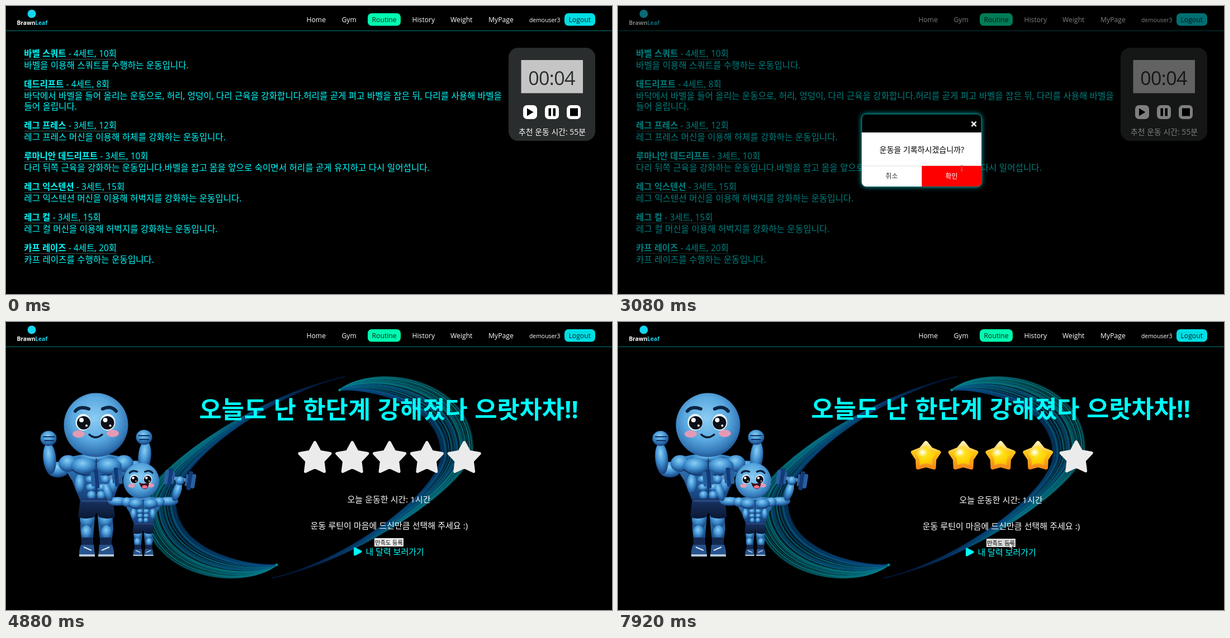
An HTML page for the animation above (7990 ms loop, 1084 by 517 pixels).

```html
<!DOCTYPE html>
<html lang="ko">
<head>
<meta charset="utf-8">
<title>Workout routine</title>
<style>
  html, body { margin: 0; width: 100%; height: 100%; overflow: hidden; background: #000; }
  svg { display: block; width: 100vw; height: 100vh; }
  text { font-family: 'Open Sans', 'Noto Sans CJK KR', 'Noto Sans KR', sans-serif; white-space: pre; }
  .nav { font-size: 12.2px; fill: #fff; }
  .mid { text-anchor: middle; }
  .cyan { fill: #0ff; }
  .name { font-size: 15.4px; word-spacing: .3px; }
  .name tspan { font-weight: 700; }
  .desc { font-size: 15.6px; word-spacing: .35px; }
  .msg { font-size: 15px; fill: #fff; word-spacing: .2px; }
  .btn { font-size: 12px; }
  .ink { fill: none; stroke: #0f3263; stroke-width: 1.8; stroke-linecap: round; }
  .limb { fill: none; stroke-linecap: round; stroke-linejoin: round; }
</style>
</head>
<body>
<svg viewBox="0 0 1084 517" preserveAspectRatio="none">
  <defs>
    <radialGradient id="skin" cx=".47" cy=".4" r=".62">
      <stop offset="0" stop-color="#8ccdf3"/><stop offset=".55" stop-color="#5aa9e0"/>
      <stop offset=".85" stop-color="#3478b8"/><stop offset="1" stop-color="#1d4f8c"/>
    </radialGradient>
    <radialGradient id="muscle" cx=".45" cy=".32" r=".68">
      <stop offset="0" stop-color="#8ad0f5"/><stop offset=".5" stop-color="#4292d2"/><stop offset="1" stop-color="#143f7c"/>
    </radialGradient>
    <linearGradient id="flesh" x1="0" y1="0" x2="0" y2="1">
      <stop offset="0" stop-color="#3a8acb"/><stop offset="1" stop-color="#133b74"/>
    </linearGradient>
    <linearGradient id="cloth" x1="0" y1="0" x2="0" y2="1">
      <stop offset="0" stop-color="#1a3566"/><stop offset="1" stop-color="#0a1733"/>
    </linearGradient>
    <linearGradient id="teal" gradientUnits="userSpaceOnUse" x1="770" y1="190" x2="545" y2="470">
      <stop offset="0" stop-color="#048a8c"/><stop offset=".45" stop-color="#067c88"/>
      <stop offset=".8" stop-color="#05386a"/><stop offset="1" stop-color="#03183a" stop-opacity=".2"/>
    </linearGradient>
    <linearGradient id="blue" gradientUnits="userSpaceOnUse" x1="770" y1="190" x2="545" y2="470">
      <stop offset="0" stop-color="#064a82"/><stop offset=".6" stop-color="#053f74"/>
      <stop offset="1" stop-color="#03183a" stop-opacity=".2"/>
    </linearGradient>
    <radialGradient id="gold" cx=".42" cy=".38" r=".65">
      <stop offset="0" stop-color="#ffec3a"/><stop offset=".6" stop-color="#ffd200"/><stop offset="1" stop-color="#fba51c"/>
    </radialGradient>
    <linearGradient id="rim" x1="0" y1="0" x2="0" y2="1">
      <stop offset="0" stop-color="#fff0b0"/><stop offset=".4" stop-color="#ffc414"/><stop offset="1" stop-color="#f18a1c"/>
    </linearGradient>
    <radialGradient id="shine">
      <stop offset="0" stop-color="#fff"/><stop offset="1" stop-color="#fff" stop-opacity="0"/>
    </radialGradient>
    <clipPath id="round"><rect x="436" y="194" width="214" height="130" rx="8"/></clipPath>

    <g id="face">
      <circle cx="161" cy="185" r="57.5" fill="url(#skin)"/>
      <g fill="#e59ab4"><ellipse cx="130" cy="201" rx="11" ry="6.500"/><ellipse cx="191" cy="200" rx="11" ry="6.500"/></g>
      <g fill="#e8f3fb"><ellipse cx="138" cy="180" rx="13.500" ry="15"/><ellipse cx="182" cy="180" rx="13.500" ry="15"/></g>
      <g fill="#0b0f18"><circle cx="139" cy="181" r="12"/><circle cx="181.500" cy="181" r="12"/></g>
      <g fill="#fff"><circle cx="135" cy="176" r="4"/><circle cx="177.500" cy="176" r="4"/><circle cx="144" cy="186" r="2"/><circle cx="186.500" cy="186" r="2"/></g>
      <path class="limb" d="M124 160Q132 150 148 156M173 156Q188 149 197 160" stroke="#0c2542" stroke-width="6"/>
    </g>
    <g id="body">
      <path d="M134 335H160L157 372L155 400H136L133 372ZM163 335H189L192 372L188 400H169L166 372Z" fill="url(#flesh)"/>
      <g fill="url(#muscle)">
        <ellipse cx="145" cy="354" rx="13" ry="17"/><ellipse cx="178" cy="354" rx="13" ry="17"/>
        <ellipse cx="144" cy="378" rx="10" ry="13"/><ellipse cx="180" cy="378" rx="10" ry="13"/>
      </g>
      <path d="M110 244Q160 228 212 244Q222 262 205 284L190 324H134L118 284Q101 262 110 244Z" fill="url(#flesh)"/>
      <g fill="url(#muscle)">
        <path d="M128 244Q160 226 194 244L161 252Z"/>
        <ellipse cx="111" cy="254" rx="17" ry="15"/><ellipse cx="211" cy="254" rx="17" ry="15"/>
        <ellipse cx="139" cy="259" rx="23" ry="15"/><ellipse cx="184" cy="259" rx="23" ry="15"/>
        <ellipse cx="132" cy="291" rx="9" ry="18"/><ellipse cx="191" cy="291" rx="9" ry="18"/>
        <ellipse cx="152" cy="283" rx="10" ry="7"/><ellipse cx="171" cy="283" rx="10" ry="7"/>
        <ellipse cx="152" cy="297" rx="9" ry="7"/><ellipse cx="171" cy="297" rx="9" ry="7"/>
        <ellipse cx="153" cy="311" rx="8" ry="8"/><ellipse cx="170" cy="311" rx="8" ry="8"/>
      </g>
      <path class="ink" d="M118 265Q138 282 161 270Q184 282 205 265M161.500 246V318"/>
      <path d="M133 317H191L195 350Q180 356 166 350L162 342L158 350Q142 356 129 350Z" fill="url(#cloth)"/>
      <path class="limb" d="M136 321H188" stroke="#25477e" stroke-width="4"/>
      <path d="M135 387H156V402H135ZM168 387H189V402H168Z" fill="#14284f"/>
      <path d="M134 400H157L159 420H131Q130 410 134 400ZM167 400H190Q194 410 193 420H165Z" fill="#27548f"/>
      <path d="M131 417H159V421H131ZM165 417H193V421H165Z" fill="#b4c6d8"/>
      <path d="M139 404L153 410M171 410L185 404" stroke="#dbe9f6" stroke-width="2"/>
    </g>
    <g id="bell">
      <rect x="-24" y="-3" width="48" height="6" fill="#6a8fc0"/>
      <g fill="#123a78"><rect x="-22" y="-17" width="8" height="34" rx="3"/><rect x="14" y="-17" width="8" height="34" rx="3"/></g>
      <g fill="#27609f"><rect x="-28" y="-13" width="7" height="26" rx="3"/><rect x="21" y="-13" width="7" height="26" rx="3"/>
        <rect x="-14" y="-11" width="4" height="22" rx="2"/><rect x="10" y="-11" width="4" height="22" rx="2"/></g>
    </g>
  </defs>

  <rect width="1084" height="517"/>

  <g id="header">
    <circle cx="46" cy="14" r="7.5" fill="#16d5ee"/>
    <text x="19.5" y="34" font-size="10.2" font-weight="700" fill="#fff">Brawn<tspan fill="#16d5ee">Leaf</tspan></text>
    <rect x="647" y="13" width="59" height="22.500" rx="7" fill="#00fcb0"/>
    <rect x="999" y="13" width="55" height="22.500" rx="7" fill="#00dfe4"/>
    <rect y="44" width="1084" height="1" fill="#007a78"/>
    <text x="936" y="28.5" font-size="10.4" font-weight="500" fill="#fff">demouser3</text>
  </g>

  <g id="list">
    <rect x="899" y="75" width="155" height="167" rx="17" fill="#2a2d2d"/>
    <rect x="921.5" y="97" width="110.5" height="59.5" fill="#c5c5c5"/>
    <text class="mid" x="976" y="141.5" font-size="34" letter-spacing="-.7" fill="#2a2d2d">00:04</text>
    <g fill="#fff"><rect x="925" y="178" width="25" height="25" rx="7"/><rect x="964" y="178" width="25" height="25" rx="7"/><rect x="1003" y="178" width="25" height="25" rx="7"/></g>
    <path d="M932 183.500L943.500 190.500L932 197.500ZM970.500 183.500H975V197.500H970.500ZM978.500 183.500H983V197.500H978.500ZM1009 183.500H1023V197.500H1009Z"/>
    <text class="mid" x="977" y="230.500" font-size="13.9" fill="#fff">추천 운동 시간: 55분</text>
  </g>

  <g id="art">
    <g id="right" fill="none"></g>
    <use href="#right" transform="rotate(180 540.5 279)"/>
    <g fill="url(#muscle)">
      <ellipse cx="93" cy="265" rx="20" ry="14"/><ellipse cx="231" cy="263" rx="20" ry="14"/>
      <ellipse cx="78" cy="245" rx="11.500" ry="28" transform="rotate(-5 78 245)"/>
      <ellipse cx="248" cy="241" rx="11.500" ry="28" transform="rotate(5 248 241)"/>
      <ellipse cx="76" cy="209" rx="14.500" ry="13.500"/><ellipse cx="247" cy="207" rx="14.500" ry="13.500"/>
    </g>
    <path class="ink" d="M67 206H87M69 213H85M237 204H257M239 211H255"/>
    <use href="#body"/>
    <use href="#face"/>
    <path class="limb" d="M149 202Q160 212 172 202" stroke="#0c1c33" stroke-width="3.500"/>
    <g fill="url(#muscle)">
      <ellipse cx="200" cy="322" rx="18" ry="8"/><ellipse cx="290" cy="322" rx="18" ry="8"/>
      <ellipse cx="182" cy="304" rx="7.500" ry="18" transform="rotate(-18 182 304)"/>
      <ellipse cx="306" cy="304" rx="7.500" ry="18" transform="rotate(18 306 304)"/>
    </g>
    <use href="#body" transform="translate(151.6 175.8) scale(.58)"/>
    <use href="#face" transform="translate(151.8 181.4) scale(.56)"/>
    <path d="M238 288Q247 293 256 287Q255 300 248 300Q241 299 238 288Z" fill="#3a1020"/>
    <ellipse cx="248" cy="296" rx="5" ry="3" fill="#f0708a"/>
    <use href="#bell" transform="translate(180 280) rotate(-5)"/>
    <use href="#bell" transform="translate(311 282) rotate(9)"/>
    <g fill="url(#muscle)"><circle cx="178" cy="283" r="8"/><circle cx="311" cy="285" r="8"/></g>
  </g>

  <g id="done">
    <g id="top">
      <text class="cyan" x="345.5" y="172.500" font-size="43.7" font-weight="700" word-spacing="1.3">오늘도 난 한단계 강해졌다 으랏차차!!</text>
      <g id="stars"></g>
    </g>
    <g id="low">
      <text class="msg mid" x="685" y="323.500">오늘 운동한 시간: 1시간</text>
      <text class="msg mid" x="685.500" y="370.500">운동 루틴이 마음에 드신만큼 선택해 주세요 :)</text>
      <rect id="save" x="659" y="388" width="52" height="15" fill="#efefef"/>
      <text class="mid" x="685" y="399.500" font-size="10.3">만족도 등록</text>
      <path class="cyan" d="M624 406.500V417.500L634.500 412Z" stroke="#0ff" stroke-width="4" stroke-linejoin="round"/>
      <text class="cyan" x="643.500" y="417.500" font-size="15">내 달력 보러가기</text>
    </g>
  </g>

  <g id="dialog">
    <rect width="1084" height="517" fill-opacity=".5"/>
    <rect x="436" y="194" width="214" height="130" rx="8" stroke="#0a8484" style="filter:drop-shadow(0 0 4px #00b4b4)"/>
    <g clip-path="url(#round)">
      <rect x="436" y="227" width="214" height="97" fill="#fff"/>
      <path d="M436 287H650M543.500 287V324" stroke="#dedede"/>
      <rect id="ok" x="543.500" y="287" width="107" height="37" fill="red"/>
    </g>
    <path d="M632.500 207.700L640.700 215.900M640.700 207.700L632.500 215.900" stroke="#fff" stroke-width="2.500"/>
    <text class="mid" x="543.500" y="262.500" font-size="14" font-weight="500">운동을 기록하시겠습니까?</text>
    <text class="btn mid" x="489.500" y="310" fill="#333">취소</text>
    <text id="okText" class="btn mid" x="596.500" y="310">확인</text>
  </g>

  <g id="cursor">
    <path id="arrow" d="M0 0V10L2.400 8L4 11.500L5.700 10.700L4.200 7.300H7.300Z" fill="#fff" stroke="#222" stroke-width=".7"/>
    <path id="hand" d="M-1 0Q0 -1 1 0V4.500L5 5.300Q6 5.700 6 7L5 12H-1.500L-4 8Q-4 6.500 -2.500 7L-1 8Z" fill="#fff" stroke="#222" stroke-width=".9"/>
    <path id="beam" d="M-2 -4.500H2M0 -4.500V4.500M-2 4.500H2" fill="none" stroke="#888"/>
  </g>
  <circle id="click" r="9" fill="#fff000" fill-opacity=".5"/>
</svg>
<script>
const LOOP = 7990;
const $ = id => document.getElementById(id);

function add(parent, tag, attrs, text) {
  const node = document.createElementNS('http://www.w3.org/2000/svg', tag);
  for (const key in attrs) node.setAttribute(key, attrs[key]);
  if (text) node.textContent = text;
  return parent.appendChild(node);
}
const show = (id, on) => { $(id).style.display = on ? '' : 'none'; };

// Navigation
[['Home', 537.5], ['Gym', 600.5], ['Routine', 654.5], ['History', 726.5], ['Weight', 795], ['MyPage', 863]]
  .forEach(([label, x]) => add($('header'), 'text', { class: 'nav', x, y: 28.8, style: label === 'Routine' ? 'fill:#06221c' : '' }, label));
add($('header'), 'text', { class: 'nav', x: 1006.5, y: 28.8, style: 'fill:#06222a' }, 'Logout');

// Exercises: centre line, underline end, name, amount, description lines
[
  [85, 198, '바벨 스쿼트', '4세트, 10회', '바벨을 이용해 스쿼트를 수행하는 운동입니다.'],
  [140, 185, '데드리프트', '4세트, 8회', '바닥에서 바벨을 들어 올리는 운동으로, 허리, 엉덩이, 다리 근육을 강화합니다.허리를 곧게 펴고 바벨을 잡은 뒤, 다리를 사용해 바벨을', '들어 올립니다.'],
  [214, 198, '레그 프레스', '3세트, 12회', '레그 프레스 머신을 이용해 하체를 강화하는 운동입니다.'],
  [269, 255, '루마니안 데드리프트', '3세트, 10회', '다리 뒤쪽 근육을 강화하는 운동입니다.바벨을 잡고 몸을 앞으로 숙이면서 허리를 곧게 유지하고 다시 일어섭니다.'],
  [324, 213, '레그 익스텐션', '3세트, 15회', '레그 익스텐션 머신을 이용해 허벅지를 강화하는 운동입니다.'],
  [379, 170, '레그 컬', '3세트, 15회', '레그 컬 머신을 이용해 허벅지를 강화하는 운동입니다.'],
  [434, 198, '카프 레이즈', '4세트, 20회', '카프 레이즈를 수행하는 운동입니다.'],
].forEach(([y, end, name, amount, ...lines]) => {
  const title = add($('list'), 'text', { class: 'name cyan', x: 32.3, y: y + 5.7 });
  add(title, 'tspan', {}, name);
  title.append(' - ' + amount);
  add($('list'), 'rect', { x: 32.5, y: y + 10, width: end - 32.5, height: 1, fill: '#3c5a5a' });
  lines.forEach((line, i) => add($('list'), 'text', { class: 'desc cyan', x: 32.3, y: y + 26.5 + 19 * i }, line));
});

// Ribbon strands, blended from the outer edge (k = 0) to the inner edge (k = 1)
let seed = 7;
const rand = () => (seed = seed * 16807 % 2147483647) / 2147483647;
for (let i = 0; i < 80; i++) {
  const k = Math.min(1, Math.max(0, i / 79 + (rand() - .5) * .06));
  const bx = 836 - 58 * k;
  add($('right'), 'path', {
    d: `M596 122C660 ${70 + 50 * k} ${bx} ${100 + 50 * k} ${bx} ${228 + 10 * k}` +
       `C${bx} ${285 + 15 * k} ${640 - 20 * k} 425 475 460`,
    stroke: rand() > .2 + .65 * k ? 'url(#teal)' : 'url(#blue)',
    'stroke-width': .6 + rand(), 'stroke-opacity': .3 + .5 * rand(),
  });
}
add($('right'), 'circle', { cx: 597, cy: 122, r: 2.5, fill: '#048a8c' });

// Rating stars
function star(cx, cy, r, inner, attrs) {
  const pts = Array.from({ length: 10 }, (_, i) => {
    const a = i * Math.PI / 5, q = i % 2 ? r * inner : r;
    return (cx + q * Math.sin(a)).toFixed(1) + ',' + (cy - q * Math.cos(a)).toFixed(1);
  });
  return add($('stars'), 'polygon', { points: pts.join(' '), 'stroke-linejoin': 'round', ...attrs });
}
const plain = [], rated = [];
for (let i = 0; i < 5; i++) {
  const x = 552.5 + 66.8 * i;
  plain.push(star(x, 245, 29, .53, { fill: '#ebebeb', stroke: '#ebebeb', 'stroke-width': 5 }));
  if (i === 4) continue;
  rated.push(star(x - 1.7, 242.5, 24.5, .65, { fill: 'url(#gold)', stroke: 'url(#rim)', 'stroke-width': 7 }));
  rated.push(add($('stars'), 'ellipse', { cx: x - 8, cy: 235, rx: 9, ry: 8, fill: 'url(#shine)' }));
}

// Pointer moves: first and last change, number of changes, from, to, ease-out power
const moves = [
  [400, 600, 4, 1058, 490, 1057, 216, 1.3],
  [740, 1140, 6, 1055, 214, 1014, 191, 1.5],
  [2400, 3080, 10, 925, 223, 615, 291, 2.2],
  [4540, 4880, 6, 700, 335, 1110, 545, 1],
  [5410, 6170, 12, 1018, 499, 760, 260, 1.6],
  [7300, 7920, 9, 757, 268, 700, 396, 1.3],
];
function pointer(t) {
  const move = moves.filter(m => t >= m[0]).pop();
  if (!move) return [-50, -50];
  const [start, end, n, x0, y0, x1, y1, pow] = move;
  const step = Math.min(n - 1, Math.floor((t - start) / (end - start) * (n - 1) + .03));
  const u = 1 - (1 - step / (n - 1)) ** pow;
  return [x0 + (x1 - x0) * u, y0 + (y1 - y0) * u];
}

function draw() {
  const t = performance.now() % LOOP;
  const between = (a, b) => t >= a && t < b;
  const [x, y] = pointer(t);
  const gold = t >= 6640;

  show('list', t < 3150);
  show('dialog', between(1410, 3150));
  show('done', t >= 3280);
  show('art', t >= 3410);

  const hover = between(2400, 3150) && x < 650 && y > 287;
  show('ok', hover);
  $('okText').setAttribute('fill', hover ? '#fff' : '#b03a30');

  plain.forEach((s, i) => { s.style.display = gold && i < 4 ? 'none' : ''; });
  rated.forEach(s => { s.style.display = gold ? '' : 'none'; });
  $('top').setAttribute('transform', `translate(0 ${gold ? -1 : 0})`);
  $('low').setAttribute('transform', `translate(0 ${gold ? 1 : 0})`);
  $('save').setAttribute('fill', gold && y > 388 ? '#dcdcdc' : '#efefef');

  const hand = t > 5410 && x < 850 && y < 273;
  const beam = between(3080, 3150);
  show('hand', hand);
  show('beam', beam);
  show('arrow', !hand && !beam);
  $('cursor').setAttribute('transform', `translate(${x.toFixed(1)} ${y.toFixed(1)})`);
  show('click', between(1280, 1410) || between(6310, 6380));
  $('click').setAttribute('cx', x);
  $('click').setAttribute('cy', y);
  requestAnimationFrame(draw);
}
draw();
</script>
</body>
</html>
```
